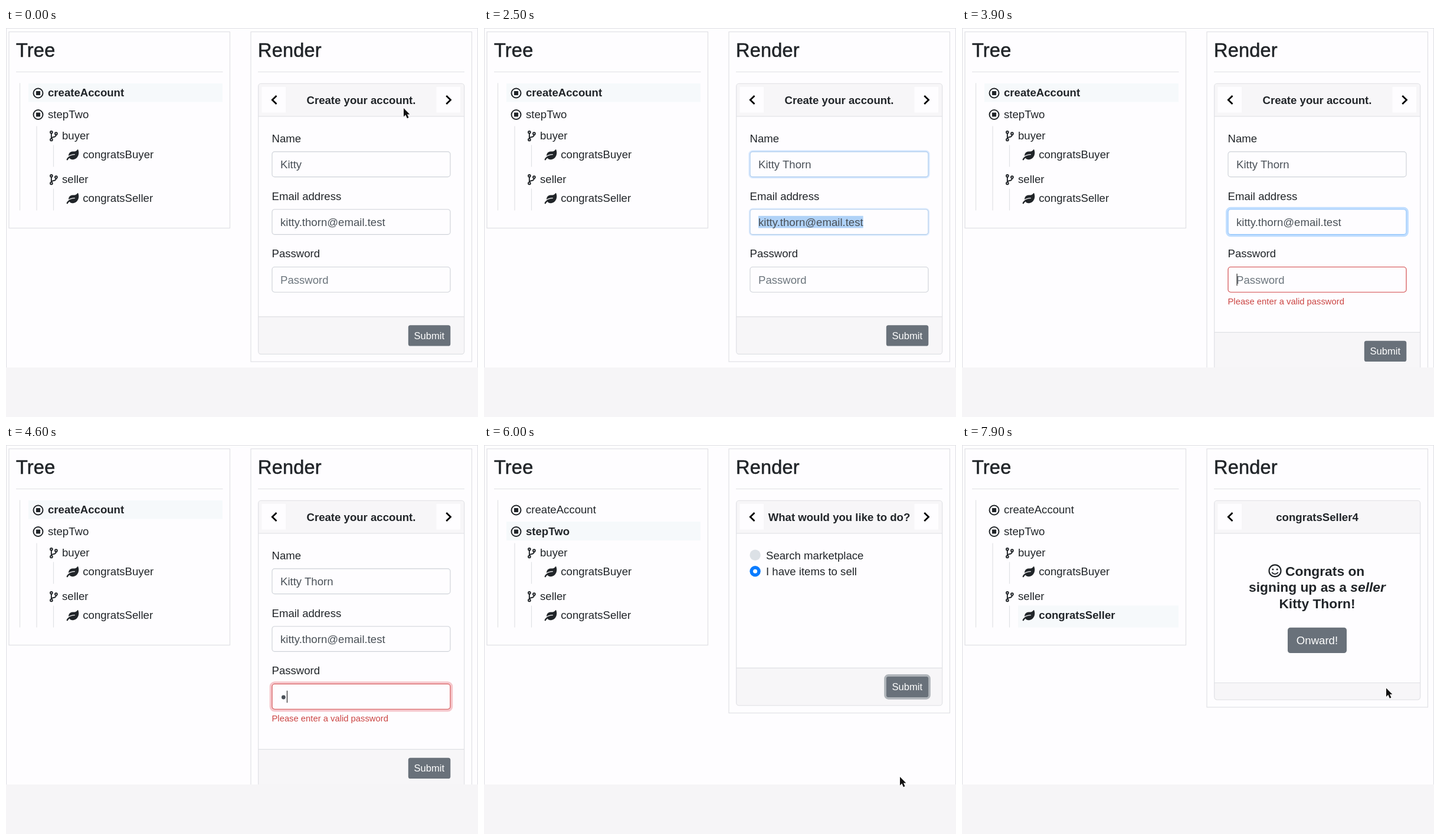
An HTML page for the animation above (8000 ms loop, 800x660 px).

```html
<!DOCTYPE html>
<html lang="en">
<head>
<meta charset="utf-8">
<title>Form flow</title>
<style>
html, body { margin: 0; width: 100%; height: 100%; overflow: hidden; background: #f6f5f7; }
svg { display: block; width: 800px; height: 660px; }
text { font: 18.6px "Liberation Sans", Arial, sans-serif; fill: #212529; white-space: pre; }
.h { font-size: 32.5px; letter-spacing: .2px; stroke: #212529; stroke-width: .6px; }
.b, .on text { font-weight: bold; }
.mid { text-anchor: middle; }
.big { font-size: 22.8px; font-weight: bold; }
.val { fill: #495057; }
.hint { fill: #6c757d; }
.err { font-size: 14.8px; fill: #cb4543; }
.light { fill: #fff; }
.small { font-size: 16.6px; }
.line { fill: none; stroke: #dfe0e4; stroke-width: 1.15; }
.bar { fill: #f7f6f8; }
.page { fill: #fefdff; }
.btn { fill: #69717a; }
.hover { fill: #5b6169; }
.ink { fill: #212529; }
.pen { fill: none; stroke: #212529; }
.mark { fill: none; }
.on .mark { fill: #f6f9fb; }
.chev { fill: none; stroke: #000; stroke-width: 2.8; }
.ring, .box { fill: none; }
.box { stroke-width: 1.15; }
</style>
</head>
<body>
<svg viewBox="0 0 800 660">
  <defs>
    <clipPath id="window"><path d="M0 0H800V576H0z"/></clipPath>
    <g id="stop">
      <circle class="pen" r="8" stroke-width="2"/>
      <rect class="ink" x="-3.6" y="-3.6" width="7.2" height="7.2" rx=".8"/>
    </g>
    <g id="branch" transform="scale(.0359)" class="pen" stroke-width="54">
      <circle cx="80" cy="80" r="52"/><circle cx="80" cy="432" r="52"/><circle cx="304" cy="144" r="52"/>
      <path d="M80 140V375M304 200C304 345 120 275 84 360"/>
    </g>
    <path id="leaf" class="ink" transform="scale(.0359)" d="M546 10c-6-13-22-13-28-1C487 62 431 96 368 96h-80C182 96 96 182 96 288l2 20C161 263 253 224 384 224c9 0 16 7 16 16s-7 16-16 16C133 256 26 410 2 468c-6 16 1 35 18 42 16 6 35-1 42-18 1-3 21-48 72-90 32 44 94 85 175 77C466 468 576 327 576 154c0-50-11-102-30-144z"/>
    <path id="arrow" d="M0 0V14.4L3.3 11.3L5.9 17.2L8.5 16.1L6 10.4H10.3z" fill="#111" stroke="#fff" stroke-width="1" paint-order="stroke"/>
    <path id="hand" d="M-2 1.4Q-2-.6-.3-.6T1.4 1.2V6Q3.6 4.8 4.3 6.6Q6.2 5.8 6.8 7.5Q9 7 9 9.3Q9 13 7.4 15.2V17.4H-.4V15.6Q-3.4 13-5.6 9.8Q-6.6 8.2-5.2 7.5Q-3.8 7-2 9.3zM1.4 6V9.5M4.3 7V9.8M6.8 8V10" fill="#fff" stroke="#111" stroke-width="1.1" stroke-linejoin="round"/>
    <path id="beam" d="M-3-8.5Q0-8.5 0-6V6Q0 8.5-3 8.5M3-8.5Q0-8.5 0-6M0 6Q0 8.5 3 8.5M-2 3H2" fill="none" stroke="#222" stroke-width="1.2"/>
  </defs>

  <g clip-path="url(#window)">
    <path class="page" d="M0 0H800V576H0z"/>
    <path class="line" d="M.5 576V.5H799.5V576"/>

    <rect class="line" x="5" y="6.5" width="374.5" height="333"/>
    <text class="h" x="17" y="49">Tree</text>
    <path class="line" d="M17 74.5H367.5M23.5 93.5V309.5M52 166.5V309.5M80.5 198.5V235.5M80.5 272.5V309.5"/>
    <g id="node0"><path class="mark" d="M38 94H367V125.5H38z"/><use href="#stop" x="54.5" y="110.5"/><text x="71" y="116.3">createAccount</text></g>
    <g id="node1"><path class="mark" d="M38 130H367V162H38z"/><use href="#stop" x="54.5" y="147"/><text x="71" y="152.5">stepTwo</text></g>
    <g transform="translate(74 174)"><use href="#branch"/></g><text x="95" y="189">buyer</text>
    <g transform="translate(102.6 206)"><use href="#leaf"/></g><text x="130.3" y="221">congratsBuyer</text>
    <g transform="translate(74 248)"><use href="#branch"/></g><text x="95" y="263">seller</text>
    <g id="node2"><path class="mark" d="M95 272.500H367V309.500H95z"/><g transform="translate(102.6 280)"><use href="#leaf"/></g><text x="130.3" y="295">congratsSeller</text></g>

    <rect id="panel" class="line" x="415" y="6.5" width="374.500"/>
    <text class="h" x="427" y="49">Render</text>
    <path class="line" d="M427 74.500H777"/>
    <path class="bar" d="M428 150V98.500Q428 94.500 432 94.500H772Q776.500 94.500 776.500 98.500V150z"/>
    <path id="foot" class="bar"/>
    <rect id="card" class="line" x="427.700" y="94.200" width="349" rx="4.600"/>
    <path id="rules" class="line"/>
    <rect class="page" x="433.500" y="100" width="40.500" height="43.500"/>
    <path class="chev" d="M458.500 115L451.300 122L458.500 129"/>
    <g id="next">
      <rect class="page" x="729.500" y="100" width="40.500" height="43.500"/>
      <path class="chev" d="M746.300 115L753.500 122L746.300 129"/>
    </g>
    <text id="title" class="b mid" x="602" y="128.500"></text>

    <g id="view0">
      <text x="450.500" y="193.500">Name</text>
      <text x="450.500" y="291.500">Email address</text>
      <text x="450.500" y="389.300">Password</text>
      <g id="fields"></g>
      <rect id="select" x="465" y="318.800" height="20.600" fill="#b0d2f7"/>
      <text id="name" class="val" x="465" y="238"></text>
      <text id="mail" class="val" x="465" y="335.800">kitty.thorn@email.test</text>
      <text id="hint" class="hint" x="465" y="433.600">Password</text>
      <g id="dots" fill="#495057"></g>
      <rect id="caret" width="1.150" height="20.500" fill="#222"/>
      <text id="error" class="err" x="450.500" y="469">Please enter a valid password</text>
    </g>
    <g id="view1">
      <circle cx="459.600" cy="186.800" r="9.200" fill="#dce1e6"/>
      <circle cx="459.600" cy="214.200" r="9.200" fill="#0a7cff"/>
      <circle cx="459.600" cy="214.200" r="3.500" fill="#fff"/>
      <text x="478" y="193.500">Search marketplace</text>
      <text x="478" y="221">I have items to sell</text>
    </g>
    <g id="view2">
      <g transform="translate(530.500 213.400)">
        <circle class="pen" r="10" stroke-width="2.200"/>
        <circle class="ink" cx="-3.600" cy="-2.300" r="1.500"/><circle class="ink" cx="3.600" cy="-2.300" r="1.500"/>
        <path class="pen" d="M-4.800 3.200Q0 8 4.800 3.200" stroke-width="2" stroke-linecap="round"/>
      </g>
      <text class="big" x="548" y="222">Congrats on</text>
      <text class="big mid" x="602" y="249.300">signing up as a <tspan font-style="italic">seller</tspan></text>
      <text class="big mid" x="602" y="276.500">Kitty Thorn!</text>
      <rect class="btn" x="552" y="309.700" width="100" height="43.300" rx="4.600"/>
      <text class="light mid" x="602" y="338">Onward!</text>
    </g>

    <g id="submit">
      <rect id="glow" x="680" y="-1.900" width="75" height="39" rx="5.500" fill="none" stroke="#828a91" stroke-width="3.700"/>
      <rect id="face" x="681.800" width="71.500" height="35.300" rx="3.600"/>
      <text class="light mid small" x="717.300" y="23.600">Submit</text>
    </g>
  </g>
  <use id="mouse"/>
</svg>
<script>
const LOOP = 8000, TICK = 100;
const $ = id => document.getElementById(id);
const set = (el, attrs) => { for (const k in attrs) el.setAttribute(k, attrs[k]); };
const show = (id, on) => { $(id).style.display = on ? '' : 'none'; };
const ease = p => { p = Math.min(1, Math.max(0, p)); return p * p * (3 - 2 * p); };
const fade = (t, from) => ease((t - from) / 150);
const count = (t, times) => times.filter(x => t >= x).length;
const mix = (a, b, p) => `color-mix(in srgb, ${b} ${p * 100}%, ${a})`;

const FIRST = 'Kitty', REST = ' Thorn';
const KEYS = [1100, 1300, 1500, 1700, 2000, 2100];
const DOTS = [4600, 4700, 4800, 4900];
const STEP_TWO = 6000, DONE = 7700, INVALID = 3200;
const TITLES = ['Create your account.', 'What would you like to do?', 'congratsSeller4'];

const FIELDS = [
  { y: 209.9, on: 500, off: 2430 },
  { y: 307.7, on: 2430, off: 3870 },
  { y: 405.5, on: 3870, off: 5850 }
];
// time, x, y of the pointer's hot spot
const PATH = [
  [0, 674, 136], [400, 622, 233], [5000, 622, 242], [5400, 705, 563],
  [6300, 705, 563], [6800, 705.5, 476], [7300, 719, 412.5], [LOOP, 719, 412.5]
];

function add(parent, tag, attrs) {
  const el = document.createElementNS('http://www.w3.org/2000/svg', tag);
  set(el, attrs);
  return parent.appendChild(el);
}

for (const f of FIELDS) {
  f.ring = add($('fields'), 'rect', { class: 'ring' });
  f.box = add($('fields'), 'rect', { class: 'box', x: 451, y: f.y, width: 302, height: 42.7, rx: 4.4 });
}
const dots = DOTS.map((_, i) => add($('dots'), 'circle', { cx: 470.4 + i * 10.4, cy: 428, r: 3.4 }));

function pointer(t) {
  const i = PATH.findIndex(k => k[0] > t) - 1;
  const [t0, x0, y0] = PATH[i], [t1, x1, y1] = PATH[i + 1];
  const p = ease((t - t0) / (t1 - t0));
  return [x0 + (x1 - x0) * p, y0 + (y1 - y0) * p];
}

function drawFields(t) {
  FIELDS.forEach((f, i) => {
    const focus = fade(t, f.on) * (1 - fade(t, f.off));
    const bad = i === 2 ? fade(t, INVALID) : 0;
    const w = 3.7 * focus, gap = .6 + w / 2;
    set(f.ring, { x: 451 - gap, y: f.y - gap, width: 302 + 2 * gap, height: 42.7 + 2 * gap, rx: 4.4 + gap,
      'stroke-width': w, 'stroke-opacity': .27 * focus, stroke: i === 2 ? '#dc3545' : '#007bff' });
    f.box.style.stroke = mix(mix('#ced2d8', '#80bdff', i === 2 ? 0 : focus), '#d14547', bad);
  });
}

function drawInput(t) {
  const typed = count(t, DOTS);
  $('name').textContent = FIRST + REST.slice(0, count(t, KEYS));
  show('hint', !typed);
  dots.forEach((d, i) => { d.style.display = i < typed ? '' : 'none'; });

  set($('select'), { width: $('mail').getComputedTextLength() });
  show('select', t >= 2500 && t < 3900);

  const inName = t >= 500 && t < 2400;
  const inPass = t >= 3900 && t < 5900 && !(t >= 5400 && t < 5700);
  show('caret', inName || inPass);
  const x = inName ? 465 + $('name').getComputedTextLength() : typed ? 465.5 + typed * 10.4 : 465.5;
  set($('caret'), { x, y: inName ? 221 : 416.8 });
}

function draw(t) {
  const view = t < STEP_TWO ? 0 : t < DONE ? 1 : 2;
  const bad = t >= INVALID;
  for (let i = 0; i < 3; i++) {
    show('view' + i, i === view);
    $('node' + i).classList.toggle('on', i === view);
  }
  $('title').textContent = TITLES[view];
  show('next', view < 2);
  show('submit', view < 2);
  show('error', bad);

  const foot = [bad ? 516.3 : 489.8, 378.4, 403.5][view];
  const bottom = foot + (view < 2 ? 63.6 : 28.7);
  set($('panel'), { height: bottom + 6.2 });
  set($('card'), { height: bottom - 94.2 });
  set($('foot'), { d: `M428 ${foot}H776.500V${bottom - 4}Q776.500 ${bottom} 772 ${bottom}H432Q428 ${bottom} 428 ${bottom - 4}z` });
  set($('rules'), { d: `M427.700 150H776.700M427.700 ${foot}H776.700` });

  if (view === 0) { drawFields(t); drawInput(t); }

  const [x, y] = pointer(t), top = foot + 14.4;
  const over = view < 2 && x > 682 && x < 753 && y > top && y < top + 35.3;
  const inField = view === 0 && x > 451 && x < 753 && FIELDS.some(f => y > f.y && y < f.y + 42.7);
  set($('submit'), { transform: `translate(0 ${top})` });
  set($('face'), { class: over ? 'hover' : 'btn' });
  set($('glow'), { 'stroke-opacity': .6 * fade(t, 5850) });
  set($('mouse'), { href: over ? '#hand' : inField ? '#beam' : '#arrow', x, y });
  show('mouse', t < 800 || t >= 5000);
}

const start = performance.now();
function frame() {
  const t = (performance.now() - start) % LOOP;
  draw(Math.floor(t / TICK) * TICK);
  requestAnimationFrame(frame);
}
frame();
</script>
</body>
</html>
```
